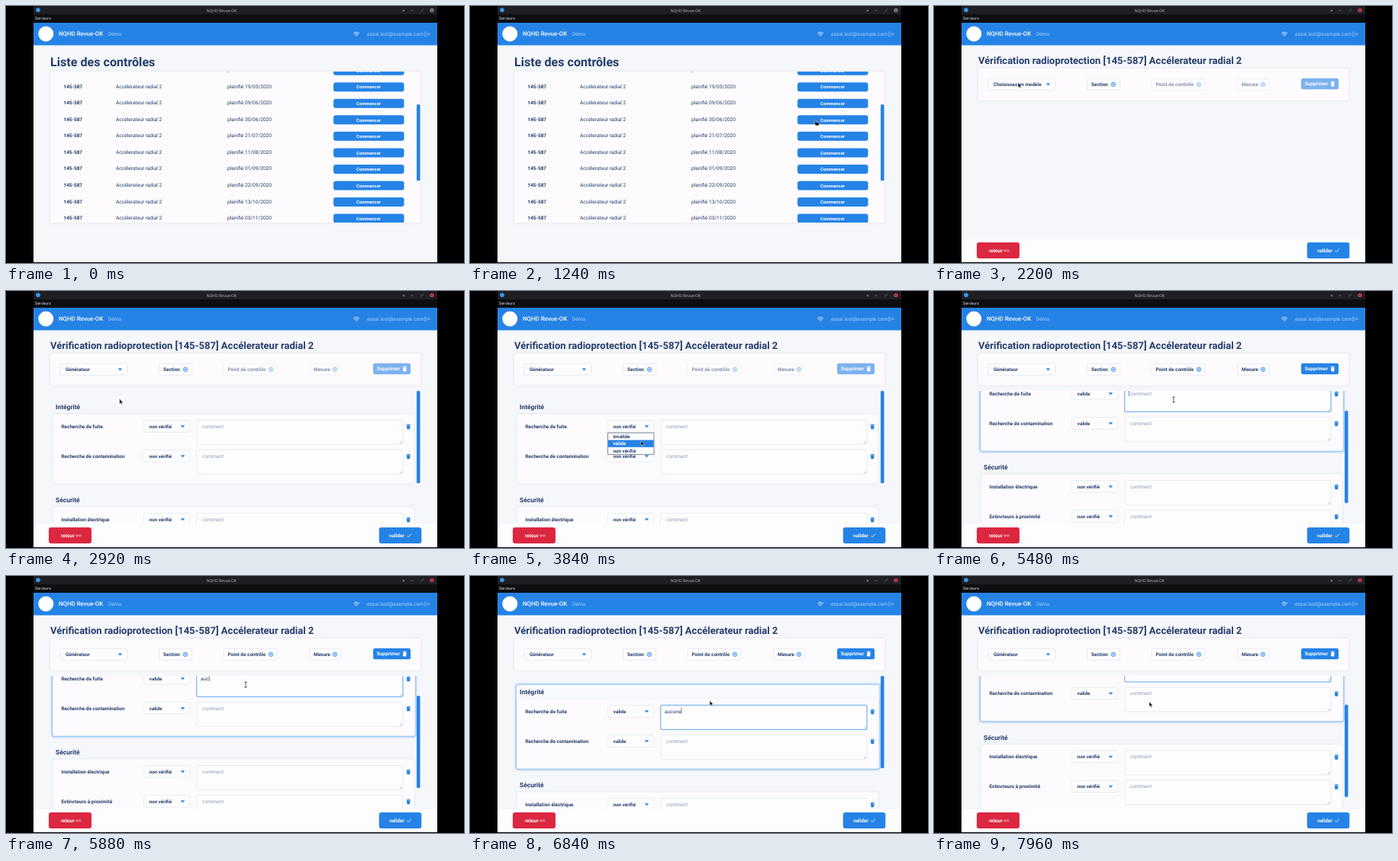
These frames come from a looping animation (600x337 px, 8000 ms). An HTML page:

```html
<!DOCTYPE html>
<html lang="fr">
<head>
<meta charset="utf-8">
<title>Contrôles</title>
<style>
  html, body { margin: 0; width: 100%; height: 100%; overflow: hidden; background: #000; }
  svg { display: block; width: 100vw; height: 100vh; }
  text { font: 400 6.6px Roboto, sans-serif; fill: #253d6b; text-rendering: geometricPrecision; white-space: pre; }
  .b { font-weight: 700; }
  .m { font-weight: 500; }
  .w { fill: #fff; }
  .line { fill: none; stroke-linecap: round; stroke-linejoin: round; }
  .card { fill: #fdfbfd; filter: drop-shadow(0 0 2px #1d3c6e18); }
  .hint { fill: #8c9ab5; }
</style>
</head>
<body>
<svg id="stage" viewBox="0 0 600 337" preserveAspectRatio="none"></svg>
<script>
const LOOP = 8000, BLUE = '#2583e6', NAVY = '#253d6b', RED = '#dc2740';
const PLACE = 'Choisissez un modèle', MODEL = 'Générateur';
const STATES = ['invalide', 'valide', 'non vérifié'];
const DEVICE = 'Accélerateur radial 2', APP = 'NQHD Revue-OK';

// Markup helpers
const rect = (x, y, w, h, fill, r = 0, more = '') =>
  `<rect x="${x}" y="${y}" width="${w}" height="${h}" rx="${r}" fill="${fill}" ${more}/>`;
const text = (x, y, s, cls = '', more = '') => `<text x="${x}" y="${y}" class="${cls}" ${more}>${s}</text>`;
const path = (d, color, width = 0.8, more = '') =>
  `<path class="line" d="${d}" stroke="${color}" stroke-width="${width}" ${more}/>`;
const group = (id, body, more = '') => `<g id="${id}" ${more}>${body}</g>`;
const size = px => `style="font-size:${px}px"`;
const caret = (x, y) => `<path d="M${x - 2.8} ${y - 1.4}h5.6l-2.8 3z" fill="${BLUE}"/>`;
const outlined = (x, y, w, h) => rect(x, y, w, h, '#fefdfe', 2, 'stroke="#e3e8f1" stroke-width=".8"');
const trash = (x, y, color) =>
  `<path d="M${x - 2.7} ${y - 2.8}h1.7l.4-.6h1.2l.4.6h1.7v.8h-5.4zM${x - 2.3} ${y - 1.5}h4.6l-.3 4.2q-.1.7-.7.7h-2.6q-.6 0-.7-.7z" fill="${color}"/>`;
const plus = (x, y) => `<circle cx="${x}" cy="${y}" r="2.8" fill="none" stroke="${BLUE}" stroke-width=".8"/>` +
  path(`M${x - 1.4} ${y}h2.8M${x} ${y - 1.4}v2.8`, BLUE, 0.8);

function chrome() {
  return rect(0, 0, 600, 337, '#000') + rect(36, 0, 529, 11.5, '#1d1f24') + rect(36, 11.5, 529, 10.5, '#0d0e11') +
    `<circle cx="42" cy="5.3" r="2.8" fill="#3994ee"/>` +
    text(282.5, 7.7, APP, '', 'text-anchor="middle" style="font-size:5.4px;fill:#a3a6ab"') +
    text(38, 18.3, 'Serveurs', '', 'style="font-size:5.4px;fill:#d5d7da"') +
    `<path d="M519.4 7l1.6-2.6 1.6 2.6z" fill="#8b8e94"/>` +
    path('M531 6h2.2M544 7l2.4-2.6', '#8b8e94', 0.7) +
    `<circle id="close" cx="558" cy="5.6" r="2.7"/>` + path('M557 4.6l2 2m0-2l-2 2', '#1d1f24', 0.6) +
    rect(36, 22, 529, 314, '#f6f7fb') + rect(36, 22, 529, 29.5, BLUE) +
    `<circle cx="52.3" cy="36.5" r="10" fill="#fff"/>` +
    text(69, 39.4, APP, 'm w', size(7.85)) +
    text(134, 39, 'Démo', '', 'style="fill:#a9d0f8"') +
    path('M455.4 35.7q3.6-3 7.2 0M456.7 37.2q2.3-2 4.6 0', '#fff', 0.8) +
    `<circle cx="459" cy="38.8" r=".8" fill="#fff"/>` +
    text(547, 39, 'essai.test@example.com', '', 'text-anchor="end" style="fill:#a9d0f8"') +
    path('M550.5 34.3h-1.7v5h1.7M550.6 36.8h4m-1.5-1.6l1.6 1.6-1.6 1.6', '#a9d0f8', 0.7);
}

function listPage() {
  let rows = '';
  for (let i = -1; i < 9; i++) {
    const y = 105.4 + i * 21.55;
    const date = new Date(Date.UTC(2020, 4, 19 + 21 * i)).toISOString().slice(0, 10).split('-').reverse().join('/');
    rows += text(75.5, y + 2.3, '145-587', 'b', size(6.4)) + text(144, y + 2.3, DEVICE) +
      text(290, y + 2.3, 'planifié ' + date) + rect(429, y - 5.2, 92.5, 12, BLUE, 3) +
      text(475, y + 3, 'Commencer', 'b w', 'text-anchor="middle" style="font-size:5.8px"');
  }
  return text(58, 79.4, 'Liste des contrôles', 'b', size(16.1)) +
    `<rect class="card" x="58" y="86" width="484.5" height="198"/>` +
    `<g clip-path="url(#listClip)">${rows}</g>` + rect(538, 129, 4.5, 100, BLUE, 1.5);
}

function toolbar() {
  const button = (x, w, label, iconX) =>
    outlined(x, 95.3, w, 15) + text(x + 5.5, 105.2, label, 'b', size(6.45)) + plus(iconX, 102.8);
  return `<rect class="card" x="58" y="82" width="485" height="41.5" rx="3"/>` +
    outlined(71, 95.3, 87.5, 15) + text(78, 105.2, PLACE, 'b', `id="model" ${size(6.35)}`) + caret(149.5, 102.8) +
    button(200.5, 43, 'Section', 235) +
    group('extra', button(285, 70, 'Point de contrôle', 347) + button(397.5, 41.5, 'Mesure', 431)) +
    group('remove', rect(481, 94.8, 49, 14.4, BLUE, 2.5) + text(485.7, 104.4, 'Supprimer', 'b w', size(6.5)) +
      trash(522.3, 102, '#fff'));
}

function field(y, label, id) {
  return text(72.5, y + 2.4, label, 'b', size(6.45)) +
    outlined(180.7, y - 7.7, 60.3, 15.5) + text(187.8, y + 2.4, STATES[2], 'b', `id="state${id}" ${size(6.2)}`) +
    caret(231.5, y + 0.3) +
    rect(249.7, y - 8, 270.3, 32, '#fefdfe', 2, `id="area${id}" stroke="#e3e8f1" stroke-width=".8"`) +
    text(257, y + 2.4, 'comment', 'hint', `id="note${id}"`) +
    path(`M516 ${y + 22.5}l2.5-2.5M517.6 ${y + 22.5}l.9-.9`, '#8a93a3', 0.5) + trash(527.2, y + 0.5, BLUE);
}

function section(y, title, labels, id) {
  return rect(60.3, y - 10, 476.5, 111.5, '#f8fafe', 3,
      `id="frame${id}" stroke="#a6cdf6" stroke-width="1.4" style="filter:drop-shadow(0 0 1.5px #78b4f488)"`) +
    `<rect class="card" x="62" y="${y + 9.5}" width="472.5" height="90.5" rx="3"/>` +
    text(65, y + 3, title, 'b', size(8.45)) +
    labels.map((label, i) => field(y + 25.3 + 39 * i, label, id + i)).join('');
}

function menu(id, x, y, w, items) {
  const h = 9.4;
  return group(id, rect(x, y, w, h * items.length, '#fff', 0, 'stroke="#42506b" stroke-width=".7"') +
    rect(x + 0.4, 0, w - 0.8, h, BLUE, 0, `id="${id}Hover"`) +
    items.map((s, i) => text(x + 6.7, y + 7 + h * i, s, 'b', `id="${id}${i}" ${size(6.3)}`)).join(''));
}

function detailPage() {
  return text(58, 76.3, `Vérification radioprotection [145-587] ${DEVICE}`, 'b', size(13)) + toolbar() +
    group('form', `<g clip-path="url(#formClip)">` + group('scroll',
        section(152, 'Intégrité', ['Recherche de fuite', 'Recherche de contamination'], 'A') +
        section(274, 'Sécurité', ['Installation électrique', 'Extincteurs à proximité'], 'B') +
        rect(277.4, 172.5, 0.6, 8.5, NAVY, 0, 'id="bar"')) + '</g>' +
      rect(538, 131, 4.5, 121, BLUE, 1.5, 'id="thumb"')) +
    rect(36, 306, 529, 30, '#fefdfe') +
    rect(56, 310, 56, 21, RED, 3) + text(72, 323.2, 'retour', 'b w') +
    path('M92 320.8h6M93.3 319.5l-1.4 1.3 1.4 1.3M96.7 319.5l1.4 1.3-1.4 1.3', '#fff', 0.6) +
    rect(488.7, 310, 55.6, 21, BLUE, 3) + text(502, 323.2, 'valider', 'b w') +
    path('M525.5 321l1.6 1.8 3.4-4', '#fff', 0.8) +
    menu('models', 71, 110.5, 87.5, [PLACE, MODEL]) +
    menu('first', 180.7, 186, 60.3, STATES) + menu('second', 180.7, 225, 60.3, STATES);
}

function cursors() {
  const edge = 'stroke="#fff" stroke-width=".45" fill="#111"';
  return group('pointer',
    group('arrow', `<path d="M0 0v6.4l1.5-1.3 1.1 2.4 1.1-.5-1.1-2.3 2-.1z" ${edge}/>`) +
    group('hand', `<path d="M0 .4q.8-.9 1.4 0v2.3l3.2.7q.8.3.7 1.2l-.5 2.7h-3.7l-2.2-2.9q.2-.9 1.1-.4z" ${edge}/>`) +
    group('beam', path('M-1.3-3.3h2.6M0-3.3v6.6M-1.3 3.3h2.6', '#222', 0.7)));
}

const stage = document.getElementById('stage');
stage.innerHTML = `<defs><clipPath id="listClip"><path d="M58 86h485v198h-485z"/></clipPath>
  <clipPath id="formClip"><path d="M56 131h487v175h-487z"/></clipPath></defs>` +
  chrome() + group('list', listPage()) + group('detail', detailPage()) + cursors();
const el = {};
stage.querySelectorAll('[id]').forEach(node => el[node.id] = node);

// Steps: time, x, y
const MOVES = [[280, 604, 262], [620, 530, 205], [900, 470, 160], [1160, 452, 149.5], [1640, 452, 149.5],
  [1860, 270, 128], [2120, 110, 100.5], [2360, 110, 100.5], [2540, 106, 122], [2740, 106, 122],
  [3180, 222, 175], [3460, 225, 176], [3720, 224, 196.5], [4000, 224, 196.5], [4220, 225, 215],
  [4380, 225, 215], [4560, 222, 236], [4720, 222, 236], [4940, 150, 198], [5060, 150, 198],
  [5340, 314, 142.5], [6320, 314, 142.5], [6640, 314, 163.5], [7160, 314, 163.5], [7560, 290, 166], [7960, 282, 165]];
const SCROLLS = [[5140, 0], [5400, 43], [6360, 43], [6640, 0], [7440, 0], [7900, 62.5]];
const TYPED = 'aucune', TYPE_START = 5640, TYPE_STEP = 110;

function at(steps, t, k) {
  const i = steps.findIndex(s => s[0] > t);
  if (i < 0) return steps[steps.length - 1][k];
  if (i === 0) return steps[0][k];
  const a = steps[i - 1], b = steps[i], u = (t - a[0]) / (b[0] - a[0]);
  return a[k] + (b[k] - a[k]) * u * u * (3 - 2 * u);
}
const show = (name, on) => el[name].style.display = on ? '' : 'none';
const label = (name, s) => { if (el[name].textContent !== s) el[name].textContent = s; };

function drawMenu(id, open, top, count, y) {
  show(id, open);
  const row = Math.floor((y + 0.5 - top) / 9.4), hover = row >= 0 ? Math.min(row, count - 1) : count === 2 ? 0 : 2;
  el[id + 'Hover'].setAttribute('y', top + hover * 9.4);
  for (let i = 0; i < count; i++) el[id + i].style.fill = i === hover ? '#fff' : NAVY;
}

function render(t) {
  const between = (a, b) => t >= a && t < b;
  const x = at(MOVES, t, 1), y = at(MOVES, t, 2), scroll = at(SCROLLS, t, 1);
  const detail = t >= 1600, picked = t >= 5000, focused = t >= 5420;
  show('list', !detail);
  show('detail', detail);
  el.close.setAttribute('fill', detail ? '#d93a4d' : '#85888e');

  label('model', t >= 2680 ? MODEL : PLACE);
  show('form', t >= 2760);
  drawMenu('models', between(2320, 2680), 110.5, 2, y);
  drawMenu('first', between(3500, 3960), 186, 3, y);
  drawMenu('second', between(4360, 4660), 225, 3, y);
  label('stateA0', STATES[t >= 3960 ? 1 : 2]);
  label('stateA1', STATES[t >= 4660 ? 1 : 2]);

  el.extra.setAttribute('opacity', picked ? 1 : 0.55);
  el.remove.setAttribute('opacity', picked ? 1 : 0.6);
  show('frameA', picked);
  show('frameB', false);
  el.areaA0.setAttribute('stroke', focused ? '#7fb6f0' : '#e3e8f1');
  el.areaA0.setAttribute('stroke-width', focused ? 1.3 : 0.8);
  el.scroll.setAttribute('transform', `translate(0 ${-scroll})`);
  el.thumb.setAttribute('y', 131 + scroll * 0.605);

  const count = Math.max(0, Math.min(TYPED.length, Math.floor((t - TYPE_START) / TYPE_STEP) + 1));
  label('noteA0', count ? TYPED.slice(0, count) : 'comment');
  el.noteA0.setAttribute('class', count ? '' : 'hint');
  el.noteA0.setAttribute('x', count ? 255 : 257);
  el.bar.setAttribute('x', 255 + (count ? el.noteA0.getComputedTextLength() + 0.2 : 0));
  show('bar', focused && (between(5420, 6300) || Math.floor((t - 6300) / 500) % 2 === 1));

  const hand = between(1060, 1640), beam = between(5260, 6560);
  show('pointer', t >= 280);
  show('hand', hand);
  show('beam', beam);
  show('arrow', !hand && !beam);
  el.pointer.setAttribute('transform', `translate(${x} ${y})`);
}

const start = performance.now();
function tick() {
  render((performance.now() - start) % LOOP);
  requestAnimationFrame(tick);
}
tick();
</script>
</body>
</html>
```
